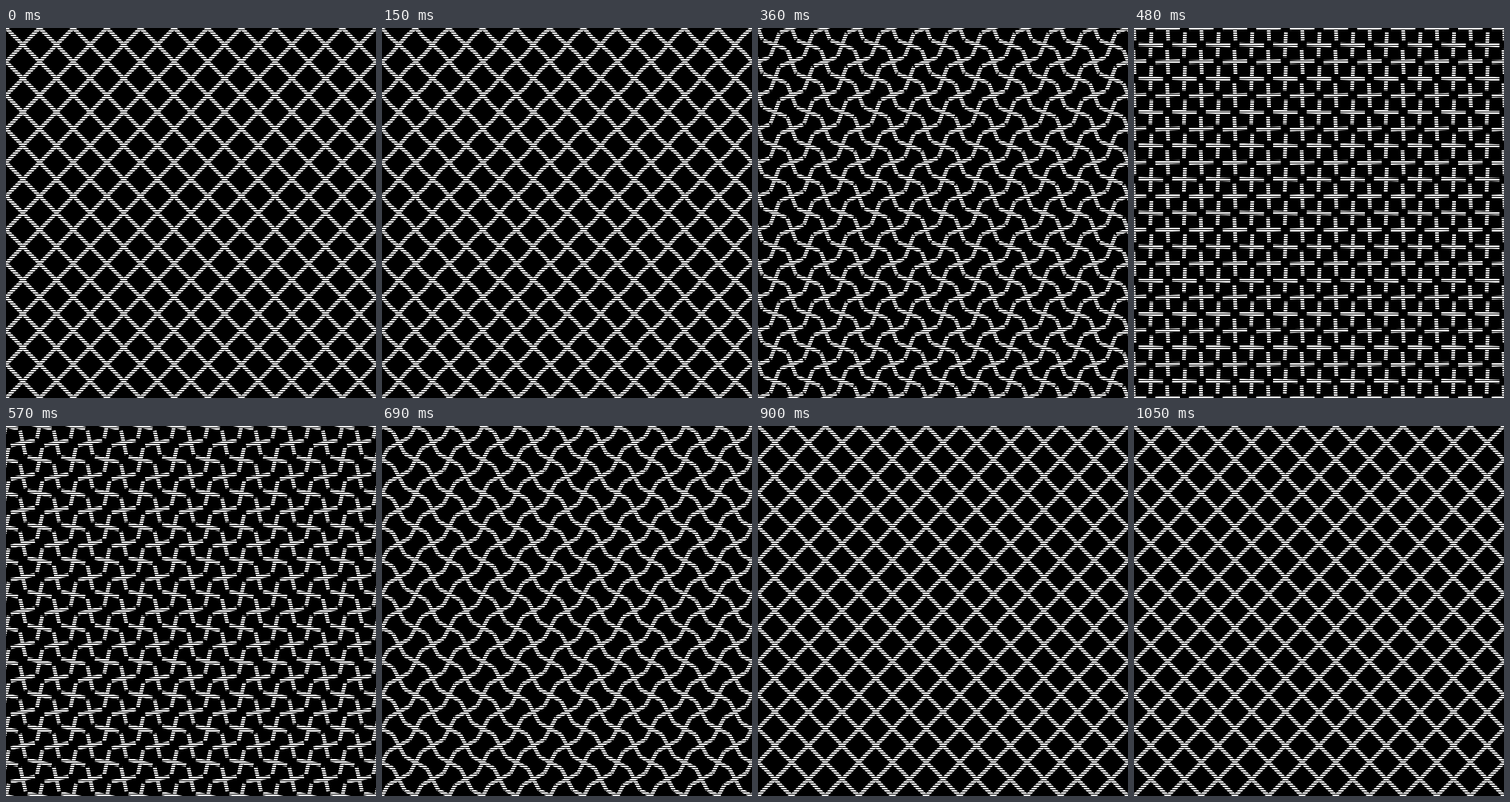
These frames come from a looping animation (500x500 px, 1.08 s). An HTML page with a canvas:

```html
<!DOCTYPE html>
<html>
<head>
<meta charset="utf-8">
<style>
html, body { margin: 0; width: 100%; height: 100%; overflow: hidden; background: #000; }
canvas { display: block; width: 500px; height: 500px; }
</style>
</head>
<body>
<canvas id="stage" width="500" height="500"></canvas>
<script>
const ctx = document.getElementById('stage').getContext('2d');
const SIZE = 500, LOOP = 1080, FRAME = 30, TURN = 990;
const STEP = SIZE / 22;
const ARM = STEP / Math.SQRT2 + 0.5;

function ease(p) {
  return p < 0.5 ? 2 * p * p : 1 - 2 * (1 - p) * (1 - p);
}

function arm(x, y, angle) {
  const dx = ARM * Math.cos(angle), dy = ARM * Math.sin(angle);
  ctx.moveTo(x - dx, y - dy);
  ctx.lineTo(x + dx, y + dy);
}

function draw(ms) {
  const turn = ease(Math.min(1, ms / TURN)) * Math.PI / 2;
  ctx.fillStyle = '#000';
  ctx.fillRect(0, 0, SIZE, SIZE);
  ctx.strokeStyle = '#fff';
  ctx.lineWidth = 5;
  ctx.beginPath();
  // neighbouring rows turn in opposite directions
  for (let row = -1; row <= 23; row++) {
    const angle = Math.PI / 4 + (row % 2 ? -turn : turn);
    for (let col = -2; col <= 24; col++) {
      if ((row + col) % 2) continue;
      arm(col * STEP, row * STEP, angle);
      arm(col * STEP, row * STEP, angle + Math.PI / 2);
    }
  }
  ctx.stroke();
  // scan lines
  ctx.fillStyle = '#000';
  for (let y = 2; y < SIZE; y += 3) ctx.fillRect(0, y, SIZE, 1);
}

const start = performance.now();
function tick() {
  const ms = (performance.now() - start) % LOOP;
  draw(Math.floor(ms / FRAME) * FRAME);
  requestAnimationFrame(tick);
}
tick();
</script>
</body>
</html>
```
